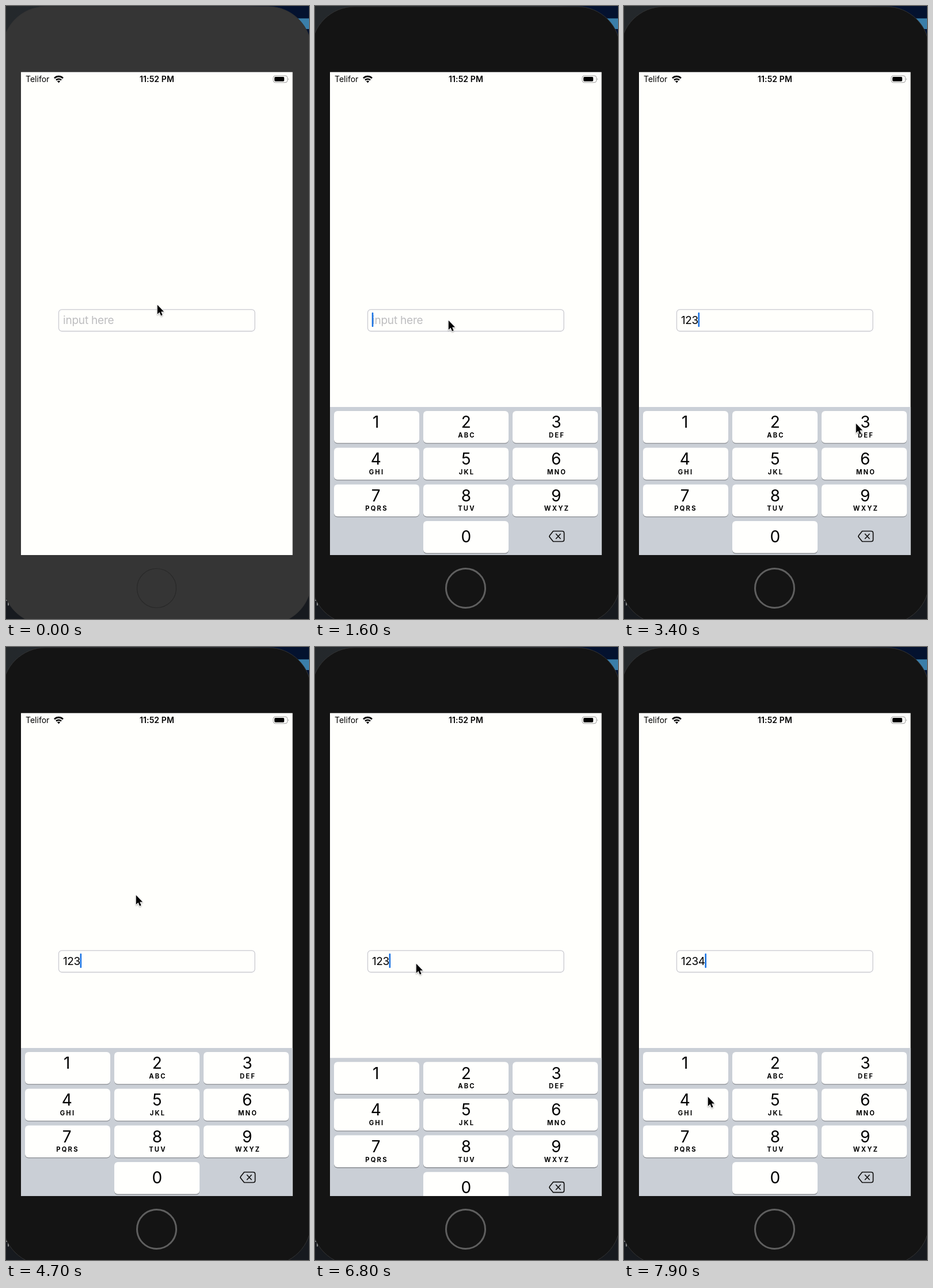
Recreate the animation shown at these times as an HTML page. Size 526x1064 px, loop 8 s.

```html
<!DOCTYPE html>
<html lang="en">
<head>
<meta charset="utf-8">
<title>Number pad input</title>
<style>
  html, body { margin: 0; width: 100%; height: 100%; overflow: hidden; background: #171a1f; }
  svg { display: block; width: 526px; height: 1064px; font-family: Inter, "Open Sans", sans-serif; }
  .status { font-size: 14px; }
  .entry { font-size: 19px; }
  .digit { font-size: 28px; text-anchor: middle; }
  .letters { font-size: 11.2px; font-weight: 700; letter-spacing: 2.2px; text-anchor: middle; }
</style>
</head>
<body>
<svg viewBox="0 0 526 1064">
  <defs>
    <linearGradient id="desk">
      <stop offset="0" stop-color="#24282b"/>
      <stop offset=".8" stop-color="#202a38"/>
      <stop offset=".84" stop-color="#04122f"/>
      <stop offset="1" stop-color="#04122f"/>
    </linearGradient>
    <clipPath id="view"><rect x="26" y="115" width="471.500" height="838"/></clipPath>
    <filter id="soft" x="-50%" y="-50%" width="200%" height="200%">
      <feDropShadow dx="0" dy="1.5" stdDeviation="1.2" flood-opacity=".35"/>
    </filter>
  </defs>

  <rect width="526" height="1064" fill="#171a1f"/>
  <rect width="526" height="60" fill="url(#desk)"/>
  <rect x="490" y="21.500" width="36" height="18.500" fill="#3a7ea9"/>
  <path d="M0 1031.500h2q2 0 2 3v6" fill="none" stroke="#aaa" stroke-width="1.500"/>

  <rect id="body" x="-6" y="1" width="536" height="1072" rx="75" stroke="#333"/>
  <circle id="home" cx="261.500" cy="1010.500" r="34" fill="none"/>
  <rect x="26" y="114.700" width="471.500" height="838.300" fill="#fffffc"/>

  <g class="status">
    <text x="34" y="132">Telifor</text>
    <text x="262" y="132" text-anchor="middle" font-weight="600" letter-spacing=".1">11:52 PM</text>
  </g>
  <g fill="none" stroke="#000" stroke-width="2.600">
    <path d="M84 125.200a10.800 10.800 0 0 1 15 0"/>
    <path d="M87 128.500a6.500 6.500 0 0 1 9 0"/>
  </g>
  <path d="M91.500 133.500l-2.600-3a4 4 0 0 1 5.200 0z"/>
  <rect x="464" y="121" width="24.500" height="11.800" rx="3.500" fill="none" stroke="#999"/>
  <rect x="466" y="123" width="17" height="7.800" rx="1.800"/>
  <path d="M490 125q1.800 2 0 4z" fill="#888"/>

  <rect x="91.500" y="526.800" width="340.500" height="37.700" rx="5.500" fill="#fffffc" stroke="#c9c9d0" stroke-width="1.300"/>
  <text id="hint" class="entry" x="99" y="552" fill="#bdbdbf" letter-spacing="-.2">input here</text>
  <text id="value" class="entry" x="99" y="552" letter-spacing="-.4"></text>
  <rect id="caret" y="532" width="2.600" height="25" rx="1" fill="#1a73e4"/>

  <g clip-path="url(#view)">
    <g id="pad">
      <rect x="26" y="696" width="472" height="258" fill="#cacfd6"/>
      <path d="M413.500 911.500H429q3.500 0 3.500 3.500v11q0 3.500-3.500 3.500H413.500L407.500 922q-1.200-1.500 0-3z
               M418.500 916.500l7.500 8m0-8l-7.500 8" fill="none" stroke="#111" stroke-width="1.700" stroke-linejoin="round" stroke-linecap="round"/>
    </g>
  </g>

  <path id="arrow" d="M0 0V18.500L4.200 14.700L7.200 21.500L10.200 20.200L7.300 13.500H13z" stroke="#fff" stroke-width="1.800"
        stroke-linejoin="round" paint-order="stroke" filter="url(#soft)"/>
</svg>

<script>
const LOOP = 8000, STEP = 100, PAD_HEIGHT = 258;
const $ = id => document.getElementById(id);
const [body, home, hint, value, caret, pad, arrow] =
  ["body", "home", "hint", "value", "caret", "pad", "arrow"].map($);

function add(parent, tag, attrs, text = "") {
  const el = document.createElementNS("http://www.w3.org/2000/svg", tag);
  for (const name in attrs) el.setAttribute(name, attrs[name]);
  el.textContent = text;
  parent.append(el);
}

function addKey(col, row, digit, letters) {
  const x = 33 + 155 * col, y = 703 + 63.7 * row, mid = 105.8 + 156.5 * col;
  const box = { x, width: 148, height: 55.5, rx: 6 };
  add(pad, "rect", { ...box, y: y + 1.3, fill: "#898c91" });
  add(pad, "rect", { ...box, y, fill: "#fffffd" });
  add(pad, "text", { class: "digit", x: mid, y: y + (digit ? 29.3 : 36.8) }, digit);
  add(pad, "text", { class: "letters", x: mid + 1.2, y: y + 46 }, letters);
}

["", "ABC", "DEF", "GHI", "JKL", "MNO", "PQRS", "TUV", "WXYZ"]
  .forEach((letters, i) => addKey(i % 3, Math.floor(i / 3), i + 1, letters));
addKey(1, 3, 0, "");

// Pointer stops: time, x, y
const path = [
  [0, 262, 518], [300, 262, 518], [800, 234, 545], [1600, 231, 545],
  [2000, 115, 724], [2200, 115, 724], [2600, 227, 720], [2900, 232, 721],
  [3300, 402, 724], [3600, 402, 724], [4300, 225, 434], [4700, 225, 430],
  [4900, 225, 430], [5400, 238, 709], [5500, 238, 711], [5900, 238, 711],
  [6400, 175, 549], [7000, 175, 549], [7500, 145, 780], [LOOP, 145, 780]
];
const typed = [[0, ""], [2200, "1"], [2800, "12"], [3400, "123"], [7600, "1234"]];
const focus = [[0, false], [1060, true], [4860, false], [6560, true]];

const latest = (table, t) => table.findLast(row => row[0] <= t);
const ease = p => p * p * (3 - 2 * p);

function pointerAt(t) {
  const i = path.findIndex(stop => stop[0] > t);
  const [t0, x0, y0] = path[i - 1], [t1, x1, y1] = path[i];
  const p = ease((t - t0) / (t1 - t0));
  return [x0 + (x1 - x0) * p, y0 + (y1 - y0) * p];
}

// Critically damped slide of the keyboard
function padOffset(since, open) {
  const w = since * 0.0183;
  const rest = since > 520 ? 0 : (1 + w) * Math.exp(-w);
  return PAD_HEIGHT * (open ? rest : 1 - rest);
}

function draw(t) {
  const active = t >= 600;
  body.setAttribute("fill", active ? "#141414" : "#353535");
  home.setAttribute("stroke", active ? "#5f5f5f" : "#292929");
  home.setAttribute("stroke-width", active ? 3 : 1.2);

  const [textTime, text] = latest(typed, t);
  value.textContent = text;
  hint.style.display = text ? "none" : "";

  const [focusTime, focused] = latest(focus, t);
  const offset = focusTime ? padOffset(t - focusTime, focused) : PAD_HEIGHT;
  pad.setAttribute("transform", `translate(0 ${offset.toFixed(2)})`);

  const blink = (t - Math.max(textTime, focusTime)) % 1000 < 650;
  caret.style.display = focused && blink ? "" : "none";
  caret.setAttribute("x", 98.7 + (text ? value.getComputedTextLength() : 0));

  const [x, y] = pointerAt(t);
  arrow.setAttribute("transform", `translate(${x + 0.8} ${y + 0.8}) scale(.87)`);
}

const start = performance.now();
function tick() {
  const t = (performance.now() - start) % LOOP;
  draw(Math.floor(t / STEP) * STEP);
  requestAnimationFrame(tick);
}
tick();
</script>
</body>
</html>
```
